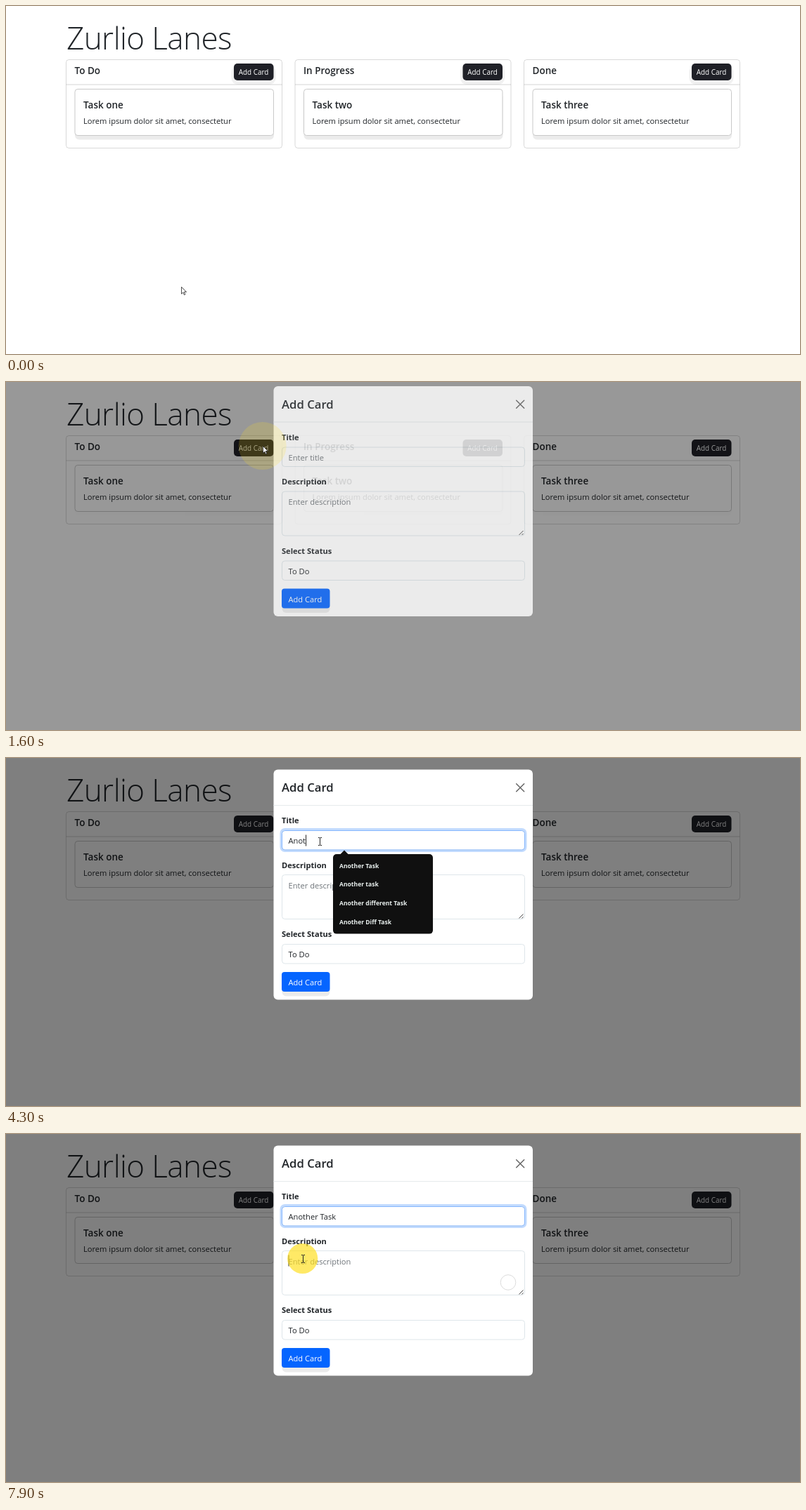
An HTML page that plays this animation: 1129 by 496 pixels, repeating every 8 s.

```html
<!DOCTYPE html>
<html lang="en">
<head>
<meta charset="utf-8">
<title>Task board</title>
<style>
  html, body { margin: 0; width: 100%; height: 100%; overflow: hidden; background: #fff; }
  svg { display: block; width: 100vw; height: 100vh; }
  text { font-family: "Open Sans", "Noto Sans", sans-serif; fill: #212529; white-space: pre; }
  .field { fill: #fff; stroke: #dee6ea; }
</style>
</head>
<body>
<svg id="stage" viewBox="0 0 1129 496"></svg>
<script>
const rect = (x, y, w, h, r, attrs) =>
  `<rect x="${x}" y="${y}" width="${w}" height="${h}" rx="${r}" ${attrs}/>`;
const text = (x, y, size, weight, str, attrs = '') =>
  `<text x="${x}" y="${y}" font-size="${size}" font-weight="${weight}" ${attrs}>${str}</text>`;

const BODY = 11.15;
const HINT = 'style="fill:#6f757a"';
const WHITE = 'style="fill:#fff"';

function column(i, name, task) {
  const x = 85.5 + 325.5 * i;
  const bands = i === 1 ? '' :
    rect(x, 76, 307, 36, 3, 'fill="#ebebeb"') + rect(x + 4.5, 116, 299, 82, 11, 'fill="#ebebeb"') +
    rect(x + 12.5, 124, 283, 66, 5, 'fill="#ddd"');
  return `<g class="bands">${bands}</g>
    <g class="shadow">
      ${rect(x + 235, 85, 63, 27, 9, 'fill="#f1f1f1"')}
      ${rect(x + 12.5, 124, 283, 66.5, 6, 'fill="#ececec"')}
    </g>
    ${rect(x, 76.5, 307, 126, 4, 'fill="none" stroke="#000" stroke-opacity=".15"')}
    <path d="M${x} 112H${x + 307}" stroke="#000" stroke-opacity=".17"/>
    ${text(x + 12, 97, 13.5, 600, name)}
    ${rect(x + 238.5, 82, 56.5, 24, 5, 'fill="#1f2027"')}
    ${text(x + 245.3, 98, 9.9, 400, 'Add Card', WHITE)}
    ${rect(x + 12.5, 118.5, 282.5, 66, 4, 'fill="#fff" stroke="#c9c9c9"')}
    ${text(x + 24.5, 145.5, 13.5, 600, task)}
    ${text(x + 24.5, 168, BODY, 400, 'Lorem ipsum dolor sit amet, consectetur')}`;
}

const stage = document.getElementById('stage');
stage.innerHTML = `
  ${text(86, 62, 44, 300, 'Zurlio Lanes', 'letter-spacing="-.6"')}
  ${column(0, 'To Do', 'Task one')}
  ${column(1, 'In Progress', 'Task two')}
  ${column(2, 'Done', 'Task three')}
  <g class="bands">${rect(1124.5, 0, 4.5, 496, 0, 'fill="#ebebeb"')}</g>
  <rect id="backdrop" width="1129" height="496"/>
  <g id="modal">
    ${rect(380.5, 16.5, 368.5, 328, 6, 'fill="#fff"')}
    ${text(392, 48, 16.7, 600, 'Add Card')}
    <path d="M725.7 36.7l11 11m0-11l-11 11" stroke="#666" stroke-width="1.5" stroke-linecap="round"/>
    <path d="M380.5 67.5H749" stroke="#e6eaec"/>
    ${text(392, 93, 11.1, 700, 'Title')}
    ${rect(391, 101.5, 348, 31, 5.5, 'id="ring" fill="none" stroke="#c2dbfe" stroke-width="3"')}
    ${rect(392.5, 103.5, 345, 27.5, 4, 'class="field"')}
    ${rect(392.5, 103.5, 345, 27.5, 4, 'id="focus" fill="none" stroke="#86b7fe"')}
    ${text(401.5, 122, BODY, 400, 'Enter title', 'id="hint" ' + HINT)}
    ${text(401.5, 122, BODY, 400, '', 'id="typed"')}
    ${text(392, 156.5, 11.1, 700, 'Description')}
    ${rect(392.5, 166.5, 345, 63, 4, 'class="field"')}
    ${text(401.5, 185.5, BODY, 400, 'Enter description', HINT)}
    <path d="M729.5 228.5l6-6m-2 6l2-2" stroke="#444"/>
    <circle id="bubble" cx="714" cy="211.5" r="10.8" fill="#fff" stroke="#dcdcdc"/>
    ${text(392, 255, 11.1, 700, 'Select Status')}
    ${rect(392.5, 265.5, 345, 27.5, 4, 'class="field"')}
    ${text(401.5, 284, BODY, 400, 'To Do')}
    ${rect(392.5, 311, 68, 28.5, 6, 'fill="#ebebeb"')}
    ${rect(392, 305, 68.5, 28, 4, 'fill="#0565ff"')}
    ${text(401.5, 324, 11.1, 500, 'Add Card', WHITE)}
    <path id="caret" stroke="#222"/>
  </g>
  <g id="list"></g>
  <circle id="pulse" fill="#ffdf20"/>
  <path id="arrow" d="M0 0V9.8L2.3 7.7 3.9 11.3 5.4 10.6 3.8 7.1H7Z" fill="#fff" stroke="#222" stroke-width=".8"/>
  <path id="beam" d="M-2.5-5.5H-.7L0-4.9.7-5.5H2.5M-2.5 5.5H-.7L0 4.9.7 5.5H2.5M0-5V5" fill="none" stroke="#222"/>`;

const el = id => document.getElementById(id);
const all = name => [...document.getElementsByClassName(name)];
const set = (id, attrs) => { for (const k in attrs) el(id).setAttribute(k, attrs[k]); };
const show = (id, on) => set(id, { opacity: +on });
const clamp = v => Math.max(0, Math.min(1, v));
const shadows = all('shadow'), bands = all('bands');

const LOOP = 8000;
const TITLE = 'Another Task';
// [time, characters typed]
const KEYS = [[2600, 0], [3600, 1], [3900, 3], [4300, 4], [4500, 5], [4600, 6], [4700, 7],
  [4800, 8], [5800, 9], [6000, 10], [6100, 11], [6300, 12]];
// [from, width, suggestions]
const LISTS = [
  [0, 0, []],
  [2800, 116, ['velanish', 'desad', 'Task one dvsddv', 'Another Task', 'sdffffffff', 'Task']],
  [3900, 142, ['Another Task', 'Another task', 'Another different Task', 'Another Diff Task']],
  [5800, 116, ['Another Task', 'Another task']],
  [6100, 0, []]
];
// [time, x, y]
const PATH = [[20, 249.5, 400.5], [200, 335, 150], [350, 335, 150], [900, 365.5, 91.5],
  [1950, 365.5, 91.5], [2400, 446.5, 119], [6750, 446.5, 119], [7400, 422.5, 178], [LOOP, 422.5, 178]];
// [press, release]
const CLICKS = [[1150, 1150], [2600, 2750], [7700, 7850]];

const latest = (rows, t) => rows.filter(r => r[0] <= t).pop();

function pointer(t) {
  const i = PATH.findIndex(p => p[0] > t);
  if (i <= 0) return PATH[0].slice(1);
  const [t0, x0, y0] = PATH[i - 1], [t1, x1, y1] = PATH[i];
  const p = (t - t0) / (t1 - t0), e = p * p * (3 - 2 * p);
  return [x0 + (x1 - x0) * e, y0 + (y1 - y0) * e];
}

let shownList = null;
function drawList(t) {
  const list = latest(LISTS, t);
  if (list === shownList) return;
  shownList = list;
  const [, width, items] = list;
  el('list').innerHTML = items.length ?
    '<path d="M474.5 138L481 131.5 487.5 138Z" fill="#101010"/>' +
    rect(465, 137, width, items.length * 26.6 + 7.2, 5, 'fill="#101010"') +
    items.map((s, i) => text(474, 156.7 + 26.6 * i, 8.55, 700, s, 'style="fill:#e9f0ee"')).join('') : '';
}

function draw(t) {
  const fade = clamp((t - 1480) / 150);
  const slide = 37 * (1 - clamp((t - 1470) / 280)) ** 2;
  set('backdrop', { opacity: fade / 2 });
  set('modal', { opacity: fade, transform: `translate(0 ${-slide})` });
  shadows.forEach(s => s.setAttribute('opacity', 1 - fade));
  bands.forEach(b => b.setAttribute('opacity', +(fade > 0 && fade < 0.7)));

  const focus = clamp((t - 2600) / 150);
  set('ring', { opacity: focus });
  set('focus', { opacity: focus });

  const [keyTime, count] = latest(KEYS, t) || [0, 0];
  el('typed').textContent = TITLE.slice(0, count);
  show('hint', !count);
  const inTextarea = t >= 7850;
  const since = inTextarea ? t - 7850 : t - keyTime;
  const caretX = 402 + (count && !inTextarea ? el('typed').getComputedTextLength() : 0);
  set('caret', { d: `M${caretX} ${inTextarea ? 172.5 : 109.5}v16` });
  show('caret', t >= 2600 && Math.floor(since / 500) % 2 === 0);
  show('bubble', inTextarea);
  drawList(t);

  const [x, y] = pointer(t);
  const overField = fade === 1 && x > 392 && ((y > 103 && y < 131) || (y > 166 && y < 230));
  set('arrow', { transform: `translate(${x} ${y})` });
  set('beam', { transform: `translate(${x} ${y})` });
  show('arrow', !overField);
  show('beam', overField);

  const click = latest(CLICKS, t);
  const age = click ? Math.max(0, t - click[1]) : 600;
  set('pulse', { cx: x - 0.8, cy: y - 0.5, r: 20 + age * 0.031, opacity: 0.75 * clamp(1 - age / 600) });
}

function tick() {
  draw(performance.now() % LOOP);
  requestAnimationFrame(tick);
}
tick();
</script>
</body>
</html>
```
